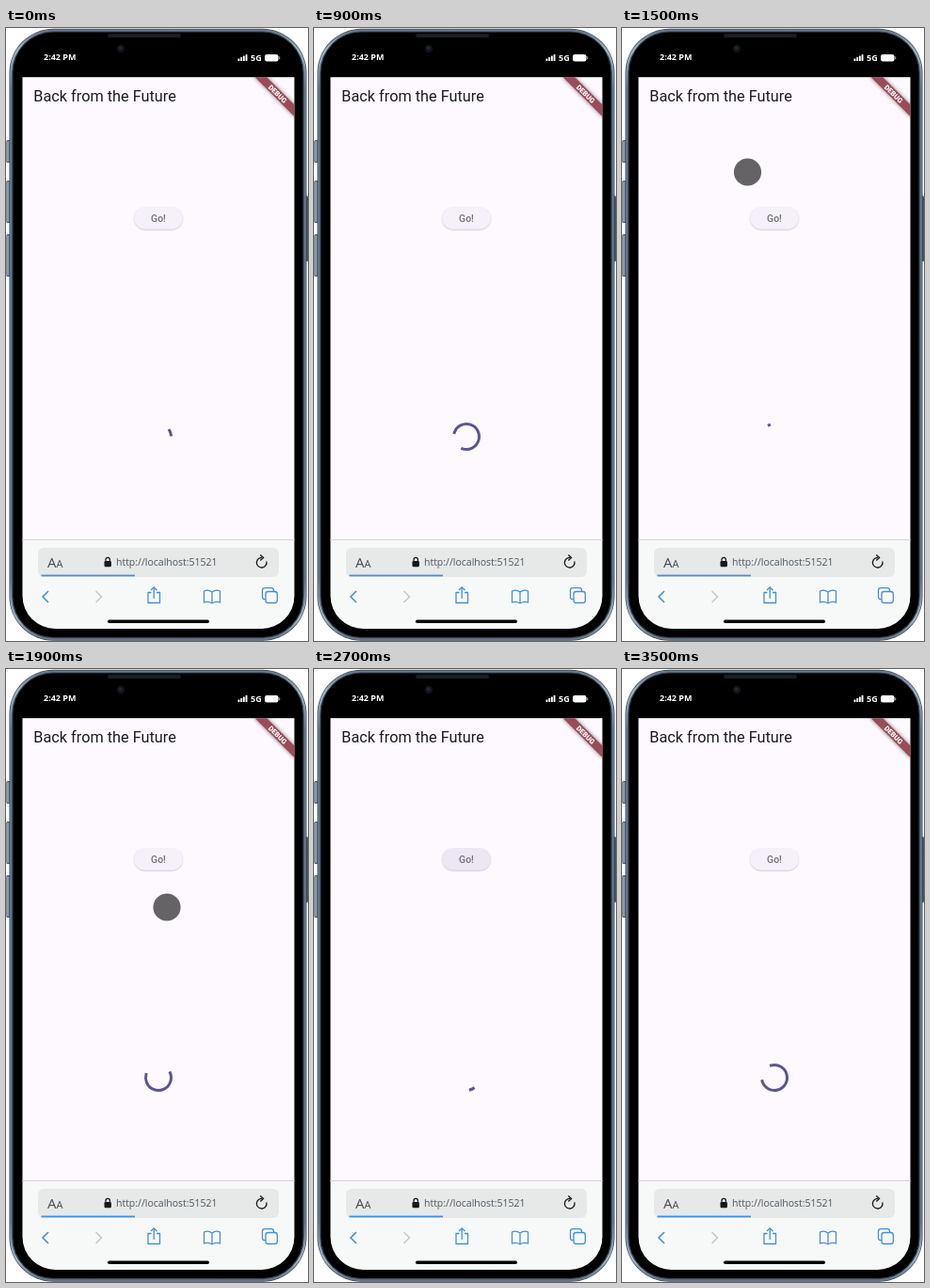
Recreate the animation shown at these times as an HTML page with a canvas. Size 321 by 651 pixels, loop 3.6 s.

```html
<!DOCTYPE html>
<html lang="en">
<head>
<meta charset="utf-8">
<title>Loading spinner</title>
<style>
html, body { margin: 0; width: 100%; height: 100%; overflow: hidden; background: #fff; }
canvas { display: block; width: 321px; height: 651px; }
</style>
</head>
<body>
<canvas id="stage"></canvas>
<script>
const W = 321, H = 651, LOOP = 3600, STEP = 100;
const RAD = Math.PI / 180;
const BLUE = '#468fd6', SCREEN = '#fef8ff';
const LEFT = 17.5, RIGHT = 306.5, TOP = 52.2;
const canvas = document.getElementById('stage');
const ctx = canvas.getContext('2d');
const ratio = window.devicePixelRatio || 1;
canvas.width = W * ratio;
canvas.height = H * ratio;

function fillBox(x, y, w, h, r, color) {
  ctx.beginPath();
  ctx.roundRect(x, y, w, h, r);
  ctx.fillStyle = color;
  ctx.fill();
}

function strokeBox(x, y, w, h, r, color, width) {
  ctx.beginPath();
  ctx.roundRect(x, y, w, h, r);
  ctx.strokeStyle = color;
  ctx.lineWidth = width;
  ctx.stroke();
}

function line(points, color, width) {
  ctx.beginPath();
  points.forEach(([x, y]) => ctx.lineTo(x, y));
  ctx.strokeStyle = color;
  ctx.lineWidth = width;
  ctx.stroke();
}

function disc(x, y, r, color) {
  ctx.beginPath();
  ctx.arc(x, y, r, 0, 2 * Math.PI);
  ctx.fillStyle = color;
  ctx.fill();
}

function label(text, x, y, font, color, align = 'left') {
  ctx.font = font;
  ctx.fillStyle = color;
  ctx.textAlign = align;
  ctx.fillText(text, x, y);
}

function shadow(color, blur, dy) {
  ctx.shadowColor = color;
  ctx.shadowBlur = blur * ratio;
  ctx.shadowOffsetY = dy * ratio;
}

// metal that shines near the rounded ends
function metal() {
  const g = ctx.createLinearGradient(0, 0, 0, H);
  g.addColorStop(0, '#5d7081');
  g.addColorStop(0.035, '#a5b5c4');
  g.addColorStop(0.1, '#64788a');
  g.addColorStop(0.9, '#64788a');
  g.addColorStop(0.965, '#a5b5c4');
  g.addColorStop(1, '#5d7081');
  return g;
}

function drawPhone() {
  // side keys
  for (const [y, h] of [[119, 24], [162, 45], [219, 45]]) {
    fillBox(0.3, y, 4.7, h, 1.5, '#4b5764');
    fillBox(1, y + 1, 2.4, h - 2, 1, '#8c9aaa');
  }
  fillBox(317, 178, 4, 70, 1.5, '#45515e');

  // body
  fillBox(3.5, 0.8, 316, 650, 47, '#3a4957');
  strokeBox(5.2, 2.4, 312.6, 646.8, 45.5, metal(), 2);
  fillBox(7.5, 4.5, 308, 642.5, 43, '#000');

  // speaker and camera
  fillBox(108, 6, 78, 4.2, 2.1, '#1b1d20');
  disc(122, 22, 4.2, '#111317');
  disc(121.6, 21.6, 2, '#23272f');
}

function drawStatus() {
  const font = '700 9px "Open Sans", "Noto Sans", sans-serif';
  label('2:42 PM', 40, 34.1, font, '#fff');
  label('5G', 260, 34.6, font, '#fff');
  for (let i = 0; i < 4; i++) {
    const h = 2.5 + i * 1.5;
    fillBox(246.5 + i * 2.7, 35 - h, 1.9, h, 0.5, '#fff');
  }
  fillBox(275, 28, 14.5, 7.5, 2.2, '#fff');
  fillBox(290.2, 30.3, 1, 3, 0.5, '#bbb');
}

function drawRibbon() {
  ctx.save();
  ctx.beginPath();
  ctx.rect(LEFT, TOP, RIGHT - LEFT, 100);
  ctx.clip();
  ctx.translate(RIGHT, TOP);
  ctx.rotate(45 * RAD);
  shadow('rgba(0,0,0,.5)', 4, 0);
  ctx.fillStyle = '#9b4b58';
  ctx.fillRect(-30, 20.7, 60, 8.9);
  shadow('transparent', 0, 0);
  label('DEBUG', 0, 27.8, '900 7.5px Roboto, sans-serif', '#fff', 'center');
  ctx.restore();
}

function drawReload() {
  ctx.beginPath();
  ctx.arc(271.7, 567.7, 5.3, -15 * RAD, 275 * RAD);
  ctx.strokeStyle = '#15181b';
  ctx.lineWidth = 1.3;
  ctx.stroke();
  line([[270.3, 559.4], [273.6, 562.4], [270.3, 565.4]], '#15181b', 1.3);
}

function drawLock() {
  fillBox(104.5, 566, 7.4, 6.2, 1.2, '#15181b');
  ctx.beginPath();
  ctx.arc(108.2, 564.6, 2.2, Math.PI, 0);
  ctx.lineTo(110.4, 566.5);
  ctx.moveTo(106, 564.6);
  ctx.lineTo(106, 566.5);
  ctx.strokeStyle = '#15181b';
  ctx.lineWidth = 1.2;
  ctx.stroke();
}

function drawNav() {
  line([[45, 598], [39, 604], [45, 610]], BLUE, 1.6);
  line([[95.5, 598], [101.5, 604], [95.5, 610]], '#c6c9cc', 1.6);

  // share
  line([[154.5, 599.5], [151, 599.5], [151, 610.5], [163.5, 610.5], [163.5, 599.5], [160, 599.5]], BLUE, 1.3);
  line([[157.2, 606], [157.2, 594]], BLUE, 1.3);
  line([[154, 597], [157.2, 593.8], [160.4, 597]], BLUE, 1.3);

  // book
  ctx.beginPath();
  for (const side of [-1, 1]) {
    const far = 219 + side * 8.5;
    ctx.moveTo(219, 599);
    ctx.quadraticCurveTo(219 + side * 4, 596, far, 598);
    ctx.lineTo(far, 610);
    ctx.quadraticCurveTo(219 + side * 4, 608.5, 219, 611);
  }
  ctx.moveTo(219, 599);
  ctx.lineTo(219, 611);
  ctx.strokeStyle = BLUE;
  ctx.lineWidth = 1.3;
  ctx.stroke();

  // tabs
  strokeBox(272.5, 594.7, 12, 12, 2.5, BLUE, 1.3);
  fillBox(276, 598.5, 12.3, 12, 2.5, '#f7f9f9');
  strokeBox(276, 598.5, 12.3, 12, 2.5, BLUE, 1.3);
}

function drawBrowserBar() {
  fillBox(LEFT, 543.5, RIGHT - LEFT, 94.5, [0, 0, 35, 35], '#f7f9f9');
  ctx.fillStyle = '#d6d5d9';
  ctx.fillRect(LEFT, 543, RIGHT - LEFT, 1);
  fillBox(34, 552, 256, 31, 6, '#e7e9e9');
  ctx.fillStyle = BLUE;
  ctx.fillRect(37.5, 580.6, 99.5, 1.8);

  const face = 'px "Open Sans", "Noto Sans", sans-serif';
  label('A', 44, 573, '15' + face, '#474c52');
  label('A', 53.5, 573, '11' + face, '#474c52');
  label('http://localhost:51521', 117, 570.9, '10.5' + face, '#4d565e');
  drawLock();
  drawReload();
  drawNav();
  fillBox(108, 628.6, 108, 3.4, 1.7, '#000');
}

// linear interpolation over [time, value] pairs
function ramp(t, keys) {
  for (let i = 1; i < keys.length; i++) {
    const [t0, a] = keys[i - 1], [t1, b] = keys[i];
    if (t <= t1) return a + (b - a) * Math.max(0, (t - t0) / (t1 - t0));
  }
  return keys[keys.length - 1][1];
}

function drawButton(t) {
  const lift = ramp(t, [[2000, 0], [2200, 1], [2400, 1], [2600, 0]]);
  const tint = ramp(t, [[2000, 0], [2100, 0.07], [2200, 0.1], [2400, 0.1], [2700, 0.06], [3000, 0]]);
  shadow('rgba(0,0,0,.22)', 1.6 + 2 * lift, 0.7 + 0.7 * lift);
  fillBox(136.2, 190.2, 51.6, 23.5, 11.75, '#f6f0fa');
  shadow('transparent', 0, 0);
  if (tint > 0) fillBox(136.2, 190.2, 51.6, 23.5, 11.75, `rgba(92,80,130,${tint})`);
  label('Go!', 162, 205.7, '500 10.4px Roboto, sans-serif', '#6d6f82', 'center');
}

// cubic-bezier(.4, 0, .2, 1)
function ease(x) {
  if (x <= 0) return 0;
  if (x >= 1) return 1;
  let lo = 0, hi = 1;
  for (let i = 0; i < 24; i++) {
    const s = (lo + hi) / 2, q = 1 - s;
    if (1.2 * s * q * q + 0.6 * s * s * q + s * s * s < x) lo = s;
    else hi = s;
  }
  return lo * lo * (3 - 2 * lo);
}

function drawSpinner(t) {
  const phase = ((t - 1552) / 1333 + 2) % 1;
  const turn = 0.943 + (t - 1500) / 2222;
  const head = ease(phase * 2), tail = ease(phase * 2 - 1);
  const start = -90 + 270 * tail + 360 * turn + 90 * phase;
  const sweep = Math.max(270 * (head - tail), 0.06);
  ctx.beginPath();
  ctx.arc(162, 434, 13.5, start * RAD, (start + sweep) * RAD);
  ctx.strokeStyle = '#5d5690';
  ctx.lineWidth = 3;
  ctx.lineCap = 'square';
  ctx.stroke();
  ctx.lineCap = 'butt';
}

function drawPointer(t) {
  if (t < 1400 || t >= 2500) return;
  const x = ramp(t, [[1400, 121], [1500, 133.5], [1700, 156], [1900, 171], [2200, 169]]);
  const y = ramp(t, [[1400, 116], [1500, 153], [1700, 220], [1900, 253], [2000, 236], [2100, 212], [2200, 201]]);
  disc(x, y, 14.6, 'rgba(0,0,0,.6)');
}

function draw(t) {
  ctx.setTransform(ratio, 0, 0, ratio, 0, 0);
  ctx.fillStyle = '#fff';
  ctx.fillRect(0, 0, W, H);
  drawPhone();
  drawStatus();
  ctx.fillStyle = SCREEN;
  ctx.fillRect(LEFT, TOP, RIGHT - LEFT, 544 - TOP);
  label('Back from the Future', 29.3, 78.2, '16.3px Roboto, sans-serif', '#1d1b20');
  drawRibbon();
  drawBrowserBar();
  drawButton(t);
  drawSpinner(t);
  drawPointer(t);
}

const began = performance.now();
function tick() {
  const t = (performance.now() - began) % LOOP;
  draw(Math.floor(t / STEP) * STEP);
  requestAnimationFrame(tick);
}
tick();
</script>
</body>
</html>
```
